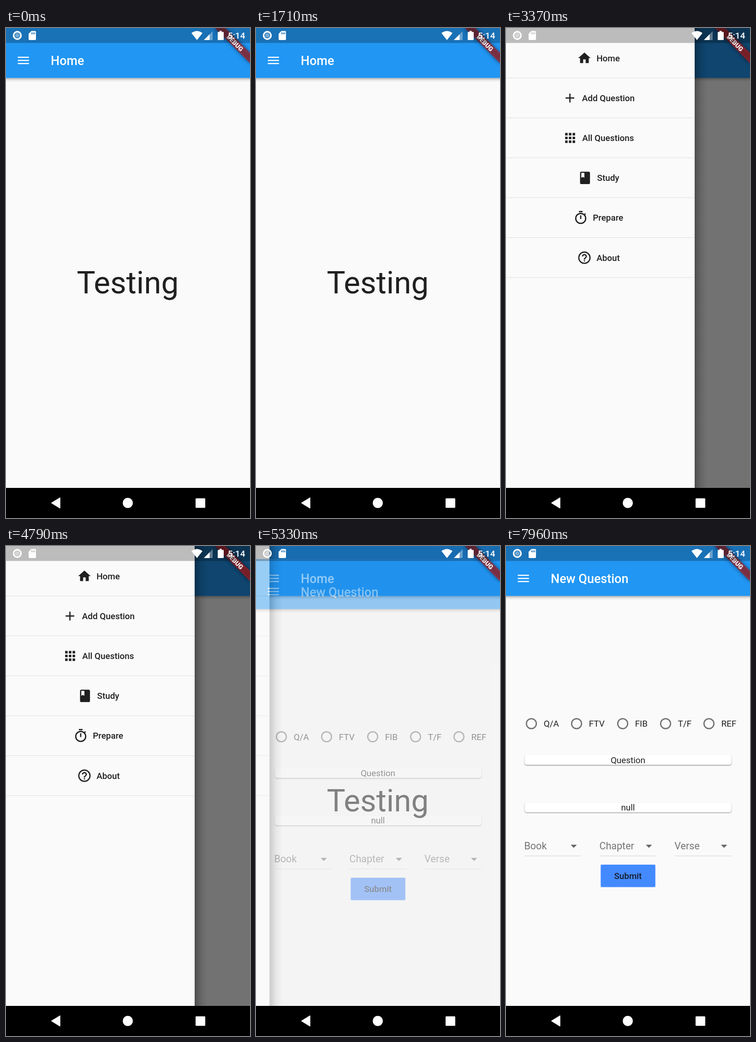
Animation, 529 px wide and 1058 px high, one loop 8000 ms. Source, as an HTML page:

```html
<!DOCTYPE html>
<html lang="en">
<head>
<meta charset="utf-8">
<title>Drawer navigation</title>
<style>
  html, body { margin: 0; width: 100%; height: 100%; overflow: hidden; background: #000; }
  svg { display: block; width: 529px; height: 1058px; font-family: Roboto, "Noto Sans", sans-serif; }
  .medium { font-weight: 500; }
  .mid { text-anchor: middle; }
</style>
</head>
<body>
<svg id="stage" viewBox="0 0 529 1058"></svg>
<script>
const W = 529, PAGE_H = 993, DP = 1.347, DRAWER_W = 409, ROW = 86.2;
const LOOP = 8000, OPEN_AT = 2413, PICK_AT = 5147;
const INK = '#202020';

const text = (x, y, size, str, fill = INK, cls = '') =>
  `<text x="${x}" y="${y}" font-size="${size}" fill="${fill}" class="${cls}">${str}</text>`;
const rect = (x, y, w, h, fill, extra = '') =>
  `<rect x="${x}" y="${y}" width="${w}" height="${h}" fill="${fill}" ${extra}/>`;
// A 24-unit icon centred on (cx, cy)
const icon = (cx, cy, body, color = INK) =>
  `<g transform="translate(${cx} ${cy}) scale(${DP}) translate(-12 -12)" fill="${color}">${body}</g>`;
const path = d => `<path d="${d}"/>`;
const ring = (cy, r) =>
  `<circle cx="12" cy="${cy}" r="${r}" fill="none" stroke="${INK}" stroke-width="2"/>`;

const ICONS = {
  menu: path('M3 6h18v2H3zM3 11h18v2H3zM3 16h18v2H3z'),
  home: path('M10 20v-6h4v6h5v-8h3L12 3 2 12h3v8z'),
  add: path('M19 13h-6v6h-2v-6H5v-2h6V5h2v6h6z'),
  apps: [4, 10, 16].map(y => path(`M4 ${y}h4v4H4zM10 ${y}h4v4h-4zM16 ${y}h4v4h-4z`)).join(''),
  book: path('M18 2H6c-1.1 0-2 .9-2 2v16c0 1.1.9 2 2 2h12c1.1 0 2-.9 2-2V4c0-1.1-.9-2-2-2zM6 4h5v8l-2.5-1.5L6 12z'),
  timer: ring(13, 8) + path('M9 1h6v2H9zM11 8h2v6h-2zM17.6 6l1.42-1.42 1.42 1.42L19 7.4z'),
  help: ring(12, 9) + path('M11 16h2v2h-2zM12 6c-2.21 0-4 1.79-4 4h2c0-1.1.9-2 2-2s2 .9 2 2c0 2-3 1.75-3 5h2c0-2.25 3-2.5 3-5 0-2.21-1.79-4-4-4z'),
  drop: path('M7 10l5 5 5-5z')
};

const appBar = title =>
  rect(0, 107.8, W, 9, 'url(#barShade)') +
  rect(0, 0, W, 107.8, '#2196f3') +
  icon(37.7, 70, ICONS.menu, '#fff') +
  text(97, 80.3, 26.94, title, '#fff', 'medium');

const page = (title, body) => rect(0, 0, W, 1058, '#fafafa') + body + appBar(title);

const radio = ([x, label]) =>
  `<circle cx="${x}" cy="383.6" r="10.8" fill="none" stroke="#737373" stroke-width="2.7"/>` +
  text(x + 26.7, 390.4, 18.86, label);

const card = (y, label) =>
  rect(40.4, y + 1.4, 448.4, 21.5, '#000', 'rx="5" opacity=".4" filter="url(#soft)"') +
  rect(40.4, y, 448.4, 21.5, '#fff', 'rx="5"') +
  text(264.4, y + 17.7, 18.86, label, INK, 'mid');

const dropdown = (x, label) =>
  text(x - 1, 655, 21.55, label, '#757575') +
  icon(x + 106.5, 647.8, ICONS.drop, '#666') +
  rect(x, 668.6, 122.5, 1, '#d2d2d2');

const form =
  [[55, 'Q/A'], [153, 'FTV'], [253, 'FIB'], [346, 'T/F'], [440, 'REF']].map(radio).join('') +
  card(451, 'Question') + card(553.4, 'null') +
  dropdown(40.4, 'Book') + dropdown(203.4, 'Chapter') + dropdown(366.3, 'Verse') +
  rect(205.3, 688, 118.5, 48.5, '#448aff', 'rx="2.7"') +
  text(264.4, 719, 18.86, 'Submit', '#141c2c', 'medium mid');

const items = [
  ['home', 170, 'Home'], ['add', 138.6, 'Add Question'], ['apps', 139, 'All Questions'],
  ['book', 171.3, 'Study'], ['timer', 162, 'Prepare'], ['help', 170, 'About']
];
const drawer =
  rect(DRAWER_W, 0, 28, PAGE_H, 'url(#drawerShade)') +
  rect(0, 0, DRAWER_W, PAGE_H, '#fafafa') +
  items.map(([name, x, label], i) =>
    icon(x, 65 + ROW * i, ICONS[name]) +
    text(x + 26.2, 71.6 + ROW * i, 18.86, label, INK, 'medium') +
    rect(0, 107.3 + ROW * i, DRAWER_W, 1, '#dfdfdf')).join('');

const banner =
  `<g transform="translate(${W} 0) rotate(45)">` +
  rect(-54, 37.7, 108, 16.2, '#000', 'opacity=".5" filter="url(#blur)"') +
  rect(-54, 37.7, 108, 16.2, '#b71c1c', 'opacity=".63"') +
  `<text y="50.7" font-size="13.74" font-weight="900" fill="#fff" class="mid">DEBUG</text></g>`;

const statusBar =
  rect(0, 0, W, 32.3, '#000', 'opacity=".25"') +
  `<g fill="#fff"><circle cx="24.5" cy="16" r="8" fill="none" stroke="#fff" stroke-width="3.4"/>
   <circle cx="24.5" cy="16" r="5" opacity=".4"/>
   <path fill-rule="evenodd" d="M55 6.5h8q2 0 2 2v15.500q0 2-2 2H51q-2 0-2-2V12.500zM55 9.500v4h1.700v-4zM58.200 9.500v4h1.700v-4zM61.400 9.500v4h1.700v-4z"/>
   <path d="M414 26L402 11q12-9 24 0z"/>
   <path d="M448 7v19h-19z" opacity=".35"/><path d="M441.500 13.500V26H429z"/>
   <path d="M463 6h4.500v2.500H471q1 0 1 1V25q0 1-1 1h-11q-1 0-1-1V9.500q0-1 1-1h3z"/></g>` +
  text(481, 23.3, 19, '5:14', '#fff', 'medium');

const navBar =
  rect(0, PAGE_H, W, 65, '#000') +
  `<path d="M99 1025.500L117 1014.500v22z" fill="#fff" stroke="#fff" stroke-width="1.5" stroke-linejoin="round"/>
   <circle cx="264" cy="1025.500" r="10.900" fill="#fff"/>` +
  rect(411, 1015.500, 21, 20.500, '#fff', 'rx="1.5"');

const shade = (id, dir, stops) => `<linearGradient id="${id}" x1="0" y1="0" ${dir}>` +
  stops.map((a, i) => `<stop offset="${i / (stops.length - 1)}" stop-color="#000" stop-opacity="${a}"/>`).join('') +
  '</linearGradient>';

document.getElementById('stage').innerHTML = `<defs>
  ${shade('barShade', 'x2="0" y2="1"', [.3, .08, 0])}
  ${shade('drawerShade', 'x2="1" y2="0"', [.32, .1, 0])}
  <filter id="soft" x="-2%" y="-40%" width="104%" height="180%"><feGaussianBlur stdDeviation="0.9"/></filter>
  <filter id="blur" x="-20%" y="-100%" width="140%" height="300%"><feGaussianBlur stdDeviation="4"/></filter>
  </defs>
  ${page('Home', text(263.8, 573, 67.35, 'Testing', INK, 'mid'))}
  ${rect(0, 0, W, PAGE_H, '#000', 'id="scrim"')}
  <g id="drawer">${drawer}</g>
  <g id="next">${page('New Question', form)}</g>
  ${banner}${statusBar}${navBar}
  <circle id="touch" cx="42" cy="77" r="15" fill="#fff" fill-opacity=".4" stroke="#c8c8e6" stroke-width="2"/>`;

const [scrim, drawerEl, next, touch] =
  ['scrim', 'drawer', 'next', 'touch'].map(id => document.getElementById(id));

const clamp = v => Math.min(1, Math.max(0, v));

// Critically damped spring from 0 towards 1, starting with unit velocity
function spring(ms) {
  if (ms <= 0) return 0;
  const t = ms / 1000, w = Math.sqrt(500), goal = 1.01;
  return clamp(goal - Math.exp(-w * t) * (goal + (goal * w - 1) * t));
}

function bezier(x1, y1, x2, y2) {
  const at = (a, b, s) => 3 * (1 - s) * (1 - s) * s * a + 3 * (1 - s) * s * s * b + s * s * s;
  return x => {
    if (x <= 0 || x >= 1) return clamp(x);
    let lo = 0, hi = 1;
    for (let i = 0; i < 24; i++) {
      const m = (lo + hi) / 2;
      if (at(x1, x2, m) < x) lo = m; else hi = m;
    }
    return at(y1, y2, lo);
  };
}
const slide = bezier(.4, 0, .2, 1), fade = bezier(.42, 0, 1, 1);

function draw(t) {
  const open = t < PICK_AT ? spring(t - OPEN_AT) : 1 - spring(t - PICK_AT);
  scrim.setAttribute('opacity', .54 * open);
  drawerEl.setAttribute('transform', `translate(${(open - 1) * DRAWER_W} 0)`);
  drawerEl.style.display = open > 0 ? '' : 'none';

  const push = clamp((t - PICK_AT) / 300);
  next.setAttribute('transform', `translate(0 ${(1 - slide(push)) * PAGE_H / 4})`);
  next.setAttribute('opacity', fade(push));
  next.style.display = push > 0 ? '' : 'none';

  const pressed = t > OPEN_AT - 90 ? clamp((OPEN_AT + 220 - t) / 220) : 0;
  touch.setAttribute('opacity', pressed);
}

const start = performance.now();
function tick() {
  draw((performance.now() - start) % LOOP);
  requestAnimationFrame(tick);
}
tick();
</script>
</body>
</html>
```
